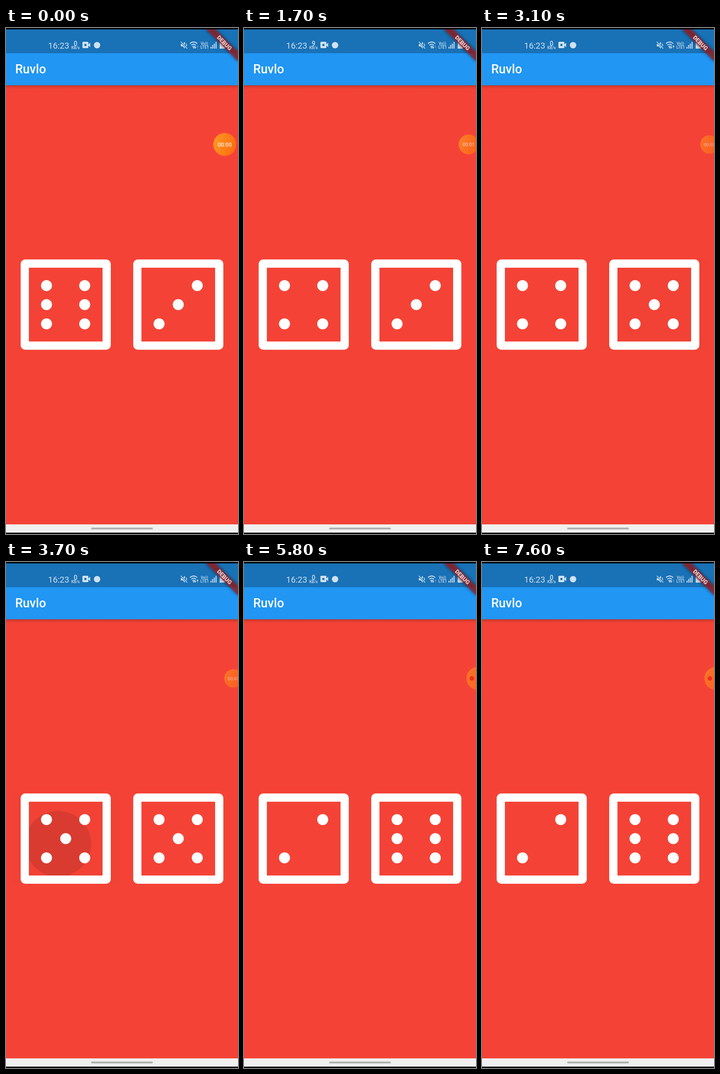
Animation of 507 by 1104 pixels, one loop 8 s. Source, as an HTML page:

```html
<!DOCTYPE html>
<html lang="en">
<head>
<meta charset="utf-8">
<title>Dice roller</title>
<style>
  html, body { margin: 0; width: 100%; height: 100%; overflow: hidden; background: #000; }
  svg { display: block; width: 507px; height: 1104px; font-family: Roboto, sans-serif; }
</style>
</head>
<body>
<svg viewBox="0 0 507 1104">
  <defs>
    <linearGradient id="shade" x2="0" y2="1">
      <stop stop-opacity=".28"/><stop offset=".4" stop-opacity=".1"/><stop offset="1" stop-opacity="0"/>
    </linearGradient>
    <linearGradient id="orange" x1="0" y1=".4" x2="1" y2=".7">
      <stop stop-color="#ff9620"/><stop offset="1" stop-color="#ff6a10"/>
    </linearGradient>
    <filter id="blur" x="-20%" y="-100%" width="140%" height="300%"><feGaussianBlur stdDeviation="3.5"/></filter>
    <clipPath id="screen"><path d="M0 3H507V1083H0Z"/></clipPath>
    <clipPath id="button"><path d="M14 505H248V702H14Z"/></clipPath>
  </defs>

  <path fill="#f44336" d="M0 124H507V1083H0Z"/>
  <path fill="url(#shade)" d="M0 124H507V134H0Z"/>
  <path fill="#2196f3" d="M0 55H507V125H0Z"/>
  <path fill="#1971b6" d="M0 3H507V55H0Z"/>
  <path fill="#f0f0f0" d="M0 1083H507V1101H0Z"/>
  <rect x="186" y="1090" width="135" height="4" rx="2" fill="#b0b0b0"/>
  <text x="20" y="99" font-size="27" font-weight="500" fill="#fff">Ruvlo</text>

  <g id="status" fill="#cfe2f1">
    <text x="92" y="44.500" font-size="18.500">16:23</text>
    <g text-anchor="middle" font-weight="500">
      <text id="rate" x="152" y="39" font-size="14">0</text>
      <text x="152" y="46" font-size="8.500">KB/s</text>
      <text x="433.500" y="37" font-size="8.500">Vo))</text>
      <text x="434" y="45" font-size="8.500">LTE1</text>
    </g>
    <rect x="167" y="30" width="13" height="14" rx="2"/>
    <path d="M180 36L184 32V42L180 38Z"/>
    <circle cx="173.500" cy="37" r="2.500" fill="#1971b6"/>
    <circle cx="199" cy="37.500" r="7"/>
    <path d="M382 35H386L391 30V45L386 40H382Z"/>
    <path d="M382 30L396 45" stroke="#1971b6" stroke-width="4"/>
    <path d="M382 30L396 45M393 34Q396 37 394 40" fill="none" stroke="#cfe2f1" stroke-width="1.500"/>
    <path d="M402 34Q410 27 418 34M405 37.500Q410 33 415 37.500M407.500 41Q410 38.500 412.500 41"
      fill="none" stroke="#cfe2f1" stroke-width="1.700"/>
    <circle cx="410" cy="43" r="1.500"/>
    <path d="M413.500 39V44M411.800 42L413.500 44.200L415.200 42" fill="none" stroke="#cfe2f1" stroke-width="1.200"/>
    <path id="upload" d="M418.500 44V39M416.800 41L418.500 38.800L420.200 41" fill="none" stroke="#cfe2f1" stroke-width="1.200"/>
    <path d="M448 45V41M451.700 45V37M455.400 45V34M459.100 45V30" stroke="#cfe2f1" stroke-width="2"/>
    <path d="M467 32H470V30H475V32H478V45H467Z"/>
  </g>

  <g clip-path="url(#screen)">
    <g transform="translate(507 3) rotate(45)">
      <rect x="-49.300" y="34.500" width="98.600" height="14.800" opacity=".5" filter="url(#blur)"/>
      <rect x="-49.300" y="34.500" width="98.600" height="14.800" fill="#b71c1c" fill-opacity=".627"/>
      <text y="46.300" text-anchor="middle" font-size="12.500" font-weight="900" fill="#fff" fill-opacity=".8">DEBUG</text>
    </g>
  </g>

  <g id="dice"></g>

  <g id="bubble">
    <circle r="29.500" fill="#ff4040" opacity=".35"/>
    <circle r="25" fill="url(#orange)"/>
    <text id="clock" y="4.500" text-anchor="middle" font-size="12" font-weight="500" fill="#fff" fill-opacity=".85">00:00</text>
    <circle id="stop" cx="-13" r="5" fill="#f02010"/>
  </g>
</svg>
<script>
const LOOP = 8000, STEP = 100;
const $ = id => document.getElementById(id);
const clamp = x => Math.max(0, Math.min(1, x));

// Each pip: x, y and the faces that show it
const PIPS = [
  [88.5, 562, '456'], [172, 562, '23456'], [88.5, 603.5, '6'], [130.5, 603.5, '135'],
  [172, 603.5, '6'], [88.5, 645.5, '23456'], [172, 645.5, '456']
];
const FIRST_FACE = [6, 3];
const TAPS = [
  { die: 0, at: 500, x: 120, face: 4 },
  { die: 1, at: 1200, x: 120, face: 3 },
  { die: 1, at: 2080, x: 120, face: 3 },
  { die: 1, at: 2800, x: 120, face: 5 },
  { die: 0, at: 3550, x: 114, face: 5 },
  { die: 1, at: 4580, x: 120, face: 6 },
  { die: 0, at: 5450, x: 114, face: 2 }
];
const TICKS = [1200, 2200, 3300, 4400];

$('dice').innerHTML = FIRST_FACE.map((_, i) => `
  <g transform="translate(${i * 246} 0)">
    <g clip-path="url(#button)">
      <rect class="glow" x="14" y="505" width="234" height="197"/>
      <circle class="ripple" cy="615"/>
    </g>
    <path fill="#fff" fill-rule="evenodd"
      d="M42 505H219a10 10 0 0 1 10 10V692a10 10 0 0 1-10 10H42a10 10 0 0 1-10-10V515a10 10 0 0 1 10-10ZM50 523V684H211V523Z"/>
    ${PIPS.map(([x, y]) => `<circle class="pip" cx="${x}" cy="${y}" r="12" fill="#fff"/>`).join('')}
  </g>`).join('');

const dice = [...$('dice').children].map(die => ({
  glow: die.querySelector('.glow'),
  ripple: die.querySelector('.ripple'),
  pips: [...die.querySelectorAll('.pip')]
}));

function set(el, attrs) {
  for (const name in attrs) el.setAttribute(name, attrs[name]);
}

function drawDie(die, i, t) {
  const taps = TAPS.filter(tap => tap.die === i);
  const rolled = taps.filter(tap => t >= tap.at + 100).pop();
  const face = rolled ? rolled.face : FIRST_FACE[i];
  die.pips.forEach((pip, k) => set(pip, { opacity: PIPS[k][2].includes(face) ? 1 : 0 }));

  const tap = taps.filter(tap => t >= tap.at).pop();
  const age = tap ? t - tap.at : LOOP;
  set(die.ripple, {
    cx: tap ? tap.x : 120,
    r: 72 * (Math.min(age, 400) / 150) ** 2.5,
    opacity: 0.1 * clamp(age / 100) * clamp((230 - age) / 80)
  });
  set(die.glow, { opacity: 0.03 * clamp((age - 100) / 120) * clamp((330 - age) / 80) });
}

function drawBubble(t) {
  const stopped = t >= 5600;
  const p = 1 - (1 - clamp((t - 1400) / 600)) ** 1.6;
  const x = stopped ? 511 : 478 + 19 * p;
  const scale = stopped ? 1 : 1 - 0.2 * p;
  set($('bubble'), { transform: `translate(${x} 254) scale(${scale})`, opacity: 1 - 0.42 * p });
  set($('clock'), { opacity: stopped ? 0 : 1 });
  set($('stop'), { opacity: stopped ? 1 : 0 });
  $('clock').textContent = '00:0' + TICKS.filter(tick => t >= tick).length;
}

function draw(now) {
  const t = Math.floor(now % LOOP / STEP) * STEP;
  dice.forEach((die, i) => drawDie(die, i, t));
  drawBubble(t);
  $('rate').textContent = t >= 900 && t < 2800 ? 9 : 0;
  set($('upload'), { opacity: t >= 2200 && t < 5200 ? 1 : 0.35 });
  requestAnimationFrame(draw);
}
requestAnimationFrame(draw);
</script>
</body>
</html>
```
